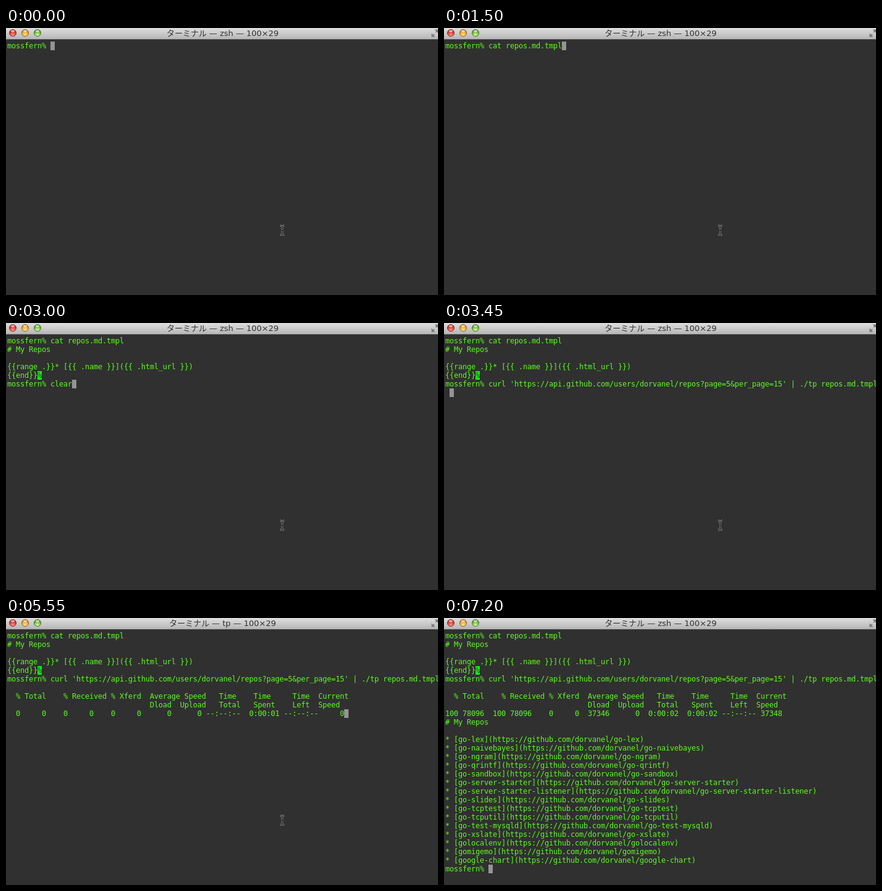
These frames come from a looping animation (700x433 px, 8.07 s). An HTML page:

```html
<!DOCTYPE html>
<html lang="ja">
<head>
<meta charset="utf-8">
<title>zsh</title>
<style>
  html, body { margin: 0; width: 100%; height: 100%; overflow: hidden; background: #303030; }
  #stage { position: relative; width: 700px; height: 433px; overflow: hidden; background: #303030; }
  #bar {
    position: absolute; left: 0; top: 0; width: 700px; height: 19px;
    background: linear-gradient(#dedede, #b6b6b6); border-bottom: 1px solid #555; box-sizing: border-box;
  }
  #title {
    position: absolute; left: 1px; top: 0; width: 700px; height: 17px; line-height: 17px;
    text-align: center; white-space: pre; color: #333;
    font-size: 13px; font-family: "DejaVu Sans", "Noto Sans CJK JP", "Noto Sans CJK", sans-serif;
  }
  svg { position: absolute; left: 0; top: 0; }
  #screen, #mark {
    position: absolute; margin: 0; white-space: pre;
    font: 12px/14px "DejaVu Sans Mono", "Liberation Mono", monospace;
    letter-spacing: calc(7px - 1ch);
  }
  #screen { left: 2px; top: 22px; color: #5cfa1e; }
  #mark { left: 51px; top: 78px; width: 7px; height: 14px; overflow: hidden; background: #0f0; color: #303030; }
  #block { position: absolute; width: 7px; height: 14px; background: #949494; }
</style>
</head>
<body>
<div id="stage">
  <div id="bar"></div>
  <svg width="700" height="19">
    <defs>
      <radialGradient id="red" cy=".85" r=".8"><stop offset="0" stop-color="#ff9a8c"/><stop offset=".6" stop-color="#e0433c"/><stop offset="1" stop-color="#a02020"/></radialGradient>
      <radialGradient id="amber" cy=".85" r=".8"><stop offset="0" stop-color="#ffe88a"/><stop offset=".6" stop-color="#f2ae3a"/><stop offset="1" stop-color="#b06a10"/></radialGradient>
      <radialGradient id="green" cy=".85" r=".8"><stop offset="0" stop-color="#d8ff9a"/><stop offset=".6" stop-color="#7cc04a"/><stop offset="1" stop-color="#3c7a20"/></radialGradient>
    </defs>
    <g stroke-width="1">
      <circle cx="11" cy="8" r="5.5" fill="url(#red)" stroke="#8a2a26"/>
      <circle cx="31" cy="8" r="5.5" fill="url(#amber)" stroke="#946020"/>
      <circle cx="51" cy="8" r="5.5" fill="url(#green)" stroke="#477530"/>
    </g>
    <g fill="#fff" opacity=".65">
      <ellipse cx="11" cy="5" rx="3" ry="1.7"/>
      <ellipse cx="31" cy="5" rx="3" ry="1.7"/>
      <ellipse cx="51" cy="5" rx="3" ry="1.7"/>
    </g>
    <path d="M689.5 8.5v6h6zM694.5 2.5h6v6z" fill="#777"/>
    <path d="M691 13l3-3M696 7l3-3" stroke="#777" stroke-width="1.6"/>
  </svg>
  <div id="title"></div>
  <div id="block"></div>
  <pre id="screen"></pre>
  <div id="mark">%</div>
  <svg id="beam" width="9" height="18" fill="none">
    <defs>
      <path id="stem" d="M1 1.5Q4.5 1.5 4.5 4.5V13.5Q4.5 16.5 1 16.5M8 1.5Q4.5 1.5 4.5 4.5M8 16.5Q4.5 16.5 4.5 13.5M3 9.5H6"/>
    </defs>
    <use href="#stem" stroke="#aaa" stroke-width="2.4"/>
    <use href="#stem" stroke="#111" stroke-width="1.2"/>
  </svg>
</div>
<script>
const LOOP = 8070;
const el = id => document.getElementById(id);

const user = 'dorvanel';
const prompt = 'mossfern% ';
const cat = prompt + 'cat repos.md.tmpl';
const curl = prompt + `curl 'https://api.github.com/users/${user}/repos?page=5&per_page=15' | ./tp repos.md.tmpl\n `;

const listing = cat + '\n# My Repos\n\n{{range .}}* [{{ .name }}]({{ .html_url }})\n{{end}}\n';
const head = listing + curl + `
  % Total    % Received % Xferd  Average Speed   Time    Time     Time  Current
                                 Dload  Upload   Total   Spent    Left  Speed
`;
const progress = spent =>
  head + `  0     0    0     0    0     0      0      0 --:--:-- ${spent} --:--:--     0`;

const repos = ('go-lex go-naivebayes go-ngram go-qrintf go-sandbox go-server-starter ' +
  'go-server-starter-listener go-slides go-tcptest go-tcputil go-test-mysqld go-xslate ' +
  'golocalenv gomigemo google-chart').split(' ');
const done = head +
  '100 78096  100 78096    0     0  37346      0  0:00:02  0:00:02 --:--:-- 37348\n# My Repos\n\n' +
  repos.map(r => `* [${r}](https://github.com/${user}/${r})\n`).join('') + prompt;

// [start ms, screen text, foreground process]
const screens = [
  [0, prompt, 'zsh'],
  [750, prompt + 'clear', 'zsh'],
  [900, curl, 'zsh'],
  [1500, cat, 'zsh'],
  [2100, listing + prompt, 'zsh'],
  [2700, listing + cat, 'zsh'],
  [3000, listing + prompt + 'clear', 'zsh'],
  [3450, listing + curl, 'zsh'],
  [4200, listing + curl + '\n', 'zsh'],
  [4350, progress('--:--:--'), 'tp'],
  [5550, progress(' 0:00:01'), 'tp'],
  [6450, done, 'zsh']
];

// [start ms, x, y]; the pointer hides off stage
const pointer = [[0, 443, 319], [6900, 453, 318], [7050, 520, 393], [7200, -20, 0]];

const at = (list, t) => list.findLast(item => item[0] <= t);
const place = (node, x, y) => { node.style.left = x + 'px'; node.style.top = y + 'px'; };

let shown;
function draw() {
  const t = performance.now() % LOOP;
  const now = at(screens, t);
  if (now !== shown) {
    shown = now;
    const [, text, process] = now;
    const rows = text.split('\n');
    el('screen').textContent = text;
    el('title').textContent = `ターミナル — ${process} — 100×29`;
    el('mark').hidden = !text.startsWith(listing);
    place(el('block'), 2 + 7 * rows.at(-1).length, 22 + 14 * (rows.length - 1));
  }
  const [, x, y] = at(pointer, t);
  place(el('beam'), x, y);
  requestAnimationFrame(draw);
}
draw();
</script>
</body>
</html>
```
